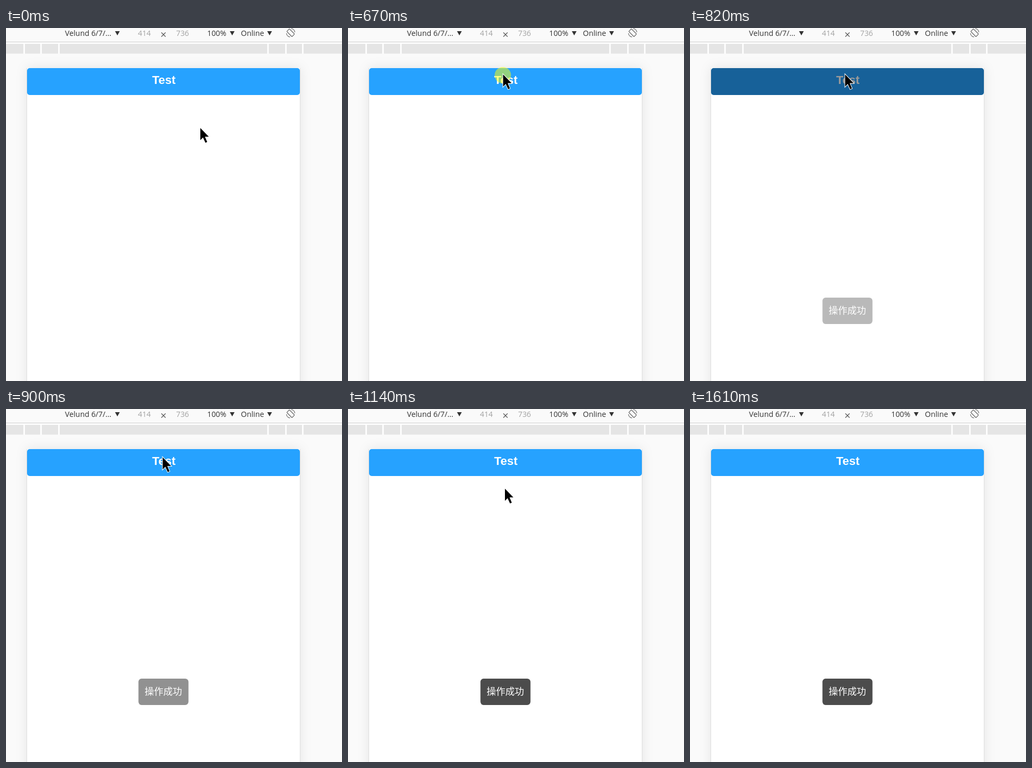
An HTML page for the animation above (2.24 s loop, 638 by 669 pixels).

```html
<!DOCTYPE html>
<html lang="en">
<head>
<meta charset="utf-8">
<style>
  html, body { margin: 0; width: 100%; height: 100%; overflow: hidden; background: #fafafa; }
  svg { display: block; width: 638px; height: 669px; }
  .bar { font: 14.3px "Open Sans", "Noto Sans", sans-serif; fill: #333; }
  .bar .size { fill: #a2a2a2; }
  .title { font: bold 22.5px "Liberation Sans", Arial, sans-serif; fill: #fff; text-anchor: middle; }
  .note { font: 17.8px "Noto Sans CJK SC", "Noto Sans CJK", sans-serif; fill: #fff; text-anchor: middle; }
  .phone { filter: drop-shadow(0 0 11px rgba(0, 0, 0, .09)); }
</style>
</head>
<body>
<svg viewBox="0 0 638 669">
  <rect width="638" height="669" fill="#fafafa"/>
  <rect y="26" width="638" height="1" fill="#ccc"/>
  <rect y="27" width="638" height="3" fill="#fdfdfd"/>
  <rect y="30" width="638" height="18.5" fill="#e5e5e5"/>
  <path d="M34.5 30v19M66.5 30v19M100.5 30v19M497.5 30v19M531.5 30v19M563.5 30v19" stroke="#fdfdfd" stroke-width="3"/>

  <g class="bar">
    <text x="112" y="15">Velund 6/7/...</text>
    <text class="size" x="250.5" y="15">414</text>
    <text class="size" x="323" y="15">736</text>
    <text x="382" y="15">100%</text>
    <text x="446" y="15">Online</text>
    <path d="M207 6h9l-4.5 8zM425 6h9l-4.5 8zM496 6h9l-4.5 8z"/>
    <path d="M295 8.5l8 8m0-8l-8 8" stroke="#555" stroke-width="1.2"/>
    <g fill="none" stroke="#666" stroke-width="1.2" transform="translate(540.5 9)">
      <rect x="-3.5" y="-7" width="7" height="14" rx="1" transform="rotate(-45)"/>
      <path d="M1 -8A8 8 0 0 1 8 -1M-1 8A8 8 0 0 1 -8 1"/>
    </g>
  </g>

  <rect class="phone" x="40" y="76" width="518" height="640" fill="#fff"/>
  <path d="M39.5 76V669M558.5 76V669" stroke="#ddd"/>
  <rect x="40" y="76" width="518" height="51" rx="5" fill="#26a2ff"/>
  <text class="title" x="299.8" y="106">Test</text>
  <rect id="pressed" x="40" y="76" width="518" height="51" rx="5" opacity=".4"/>

  <g id="toast">
    <rect x="251.5" y="511" width="95" height="50" rx="6.2" fill-opacity=".7"/>
    <text class="note" x="298.8" y="542">操作成功</text>
  </g>

  <circle id="tap" cx="294" cy="89.5" r="15.5" fill="#ff0" opacity=".5"/>
  <path id="cursor" d="M0 0V23L5 18L9.7 28L13 26.5L8.8 16.5H16Z" stroke="#fff" stroke-width="2" paint-order="stroke"/>
</svg>
<script>
const LOOP = 2240, STEP = 76.5, LEAD = 26;
// Cursor key points: step, x, y
const PATH = [[0, 369, 189.5], [5, 312, 68.5], [7, 294.5, 88], [11, 294.5, 88],
  [12, 297.5, 91.5], [15, 298, 151], [21, 510, 695]];

const [pressed, toast, tap, cursor] = ['pressed', 'toast', 'tap', 'cursor'].map(id => document.getElementById(id));
const clamp = v => Math.min(1, Math.max(0, v));
const smooth = v => v * v * (3 - 2 * v);
const show = (el, on) => el.setAttribute('visibility', on ? 'visible' : 'hidden');

function cursorAt(step) {
  let [, x, y] = PATH[0];
  for (let i = 1; i < PATH.length; i++) {
    const [from, x0, y0] = PATH[i - 1], [to, x1, y1] = PATH[i];
    const k = smooth(clamp((step - from) / (to - from)));
    x += (x1 - x0) * k;
    y += (y1 - y0) * k;
  }
  return [x, y];
}

function draw() {
  const step = Math.floor((performance.now() % LOOP + LEAD) / STEP);
  cursor.setAttribute('transform', `translate(${cursorAt(step)})`);
  show(tap, step === 9);
  show(pressed, step === 10 || step === 11);
  toast.setAttribute('opacity', clamp((step - 9.3) / 4.4));
  requestAnimationFrame(draw);
}
draw();
</script>
</body>
</html>
```
